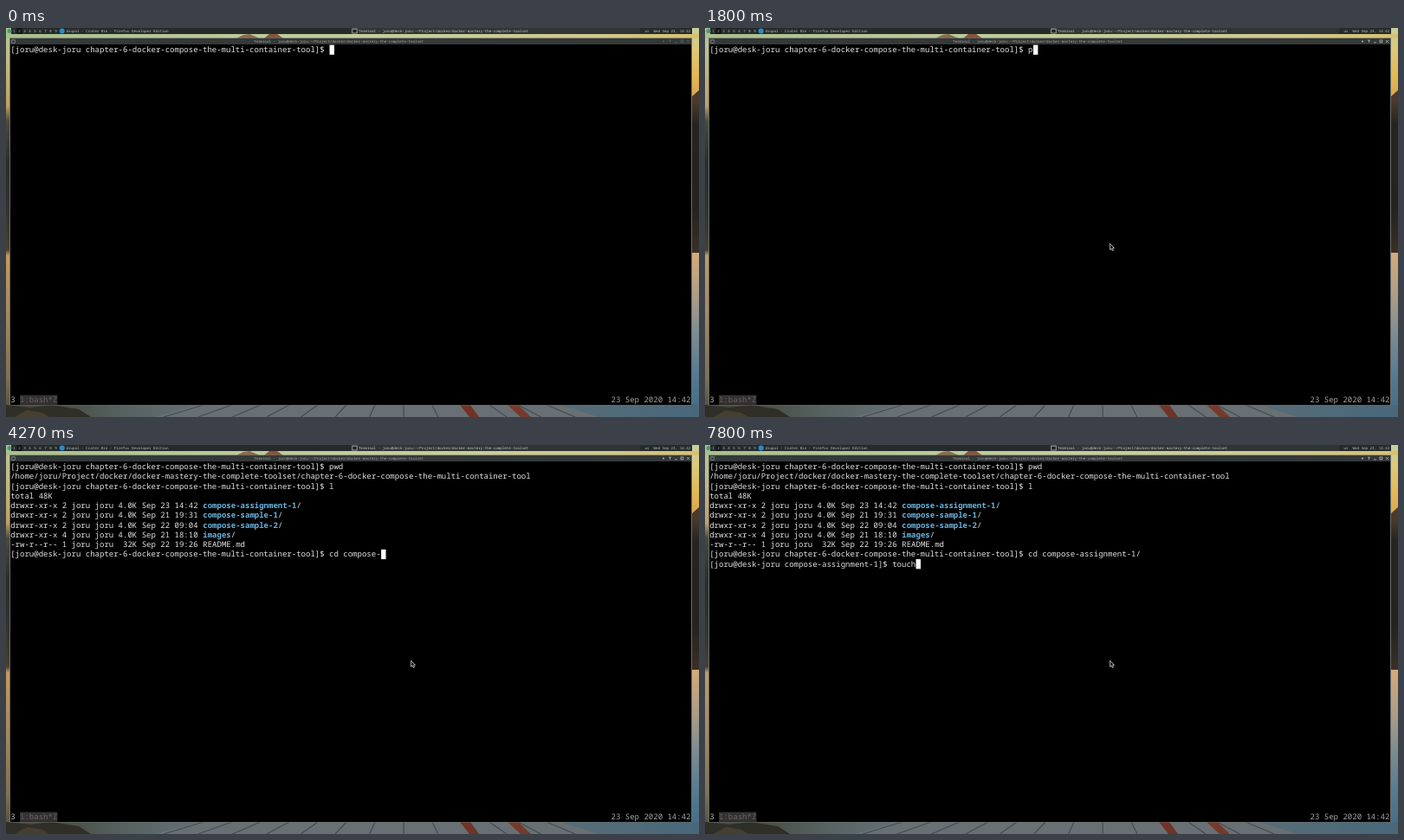
An HTML page with a canvas that plays this animation: 800x450 px, repeating every 8000 ms.

```html
<!DOCTYPE html>
<html lang="en">
<head>
<meta charset="utf-8">
<title>Terminal session</title>
<style>
html, body { margin: 0; width: 100%; height: 100%; overflow: hidden; background: #000; }
canvas { display: block; width: 800px; height: 450px; }
</style>
</head>
<body>
<canvas id="stage" width="800" height="450"></canvas>
<script>
const ctx = document.getElementById('stage').getContext('2d');
const LOOP = 8000;
const CELL_W = 65 / 12, CELL_H = 11.25, LEFT = 5.2, TOP = 19.6;
const MONO = '"Noto Sans Mono", "DejaVu Sans Mono", monospace';
const WHITE = '#e2e2e2', BLUE = '#68b4de';

const USER = 'joru', HOST = 'desk-joru';
const CHAPTER = 'chapter-6-docker-compose-the-multi-container-tool';
const COURSE = 'Project/docker/docker-mastery-the-complete-toolset';
const TITLE = `Terminal - ${USER}@${HOST}:~/${COURSE}`;
const prompt = dir => `[${USER}@${HOST} ${dir}]$ `;

// Each command: prompt folder, [time, typed text] pairs, time of Enter, output.
const entry = (mode, links, size, date, name, isDir) => ({
  text: `${mode} ${links} ${USER} ${USER} ${size} Sep ${date} `, name, isDir
});
const dir = (links, date, name) => entry('drwxr-xr-x', links, '4.0K', date, name, true);

const commands = [
  { dir: CHAPTER, keys: [[1800, 'p'], [1870, 'pw'], [2000, 'pwd']], enter: 2130,
    output: [{ text: `/home/${USER}/${COURSE}/${CHAPTER}` }] },
  { dir: CHAPTER, keys: [[2670, 'l']], enter: 3070,
    output: [
      { text: 'total 48K' },
      dir(2, '23 14:42', 'compose-assignment-1'),
      dir(2, '21 19:31', 'compose-sample-1'),
      dir(2, '22 09:04', 'compose-sample-2'),
      dir(4, '21 18:10', 'images'),
      entry('-rw-r--r--', 1, ' 32K', '22 19:26', 'README.md', false)
    ] },
  { dir: CHAPTER, keys: [
      [3670, 'c'], [3730, 'cd'], [3870, 'cd '], [3930, 'cd c'], [4070, 'cd co'],
      [4130, 'cd com'], [4270, 'cd compose-'], [5000, 'cd compose-a'],
      [5200, 'cd compose-assignment-1/']], enter: 5870, output: [] },
  { dir: 'compose-assignment-1', keys: [
      [6270, 't'], [6400, 'to'], [6530, 'toc'], [6600, 'tocu'], [6930, 'toc'],
      [7070, 'to'], [7600, 'tou'], [7670, 'touc'], [7800, 'touch']], enter: Infinity, output: [] }
];

function rect(x, y, w, h, fill) {
  ctx.fillStyle = fill;
  ctx.fillRect(x, y, w, h);
}

function poly(points, fill) {
  ctx.beginPath();
  points.forEach(([x, y]) => ctx.lineTo(x, y));
  ctx.closePath();
  ctx.fillStyle = fill;
  ctx.fill();
}

function dot(x, y, r, fill) {
  ctx.beginPath();
  ctx.arc(x, y, r, 0, Math.PI * 2);
  ctx.fillStyle = fill;
  ctx.fill();
}

function line(x1, y1, x2, y2, color, width = 1) {
  ctx.beginPath();
  ctx.moveTo(x1, y1);
  ctx.lineTo(x2, y2);
  ctx.strokeStyle = color;
  ctx.lineWidth = width;
  ctx.stroke();
}

function label(text, x, y, color, size = 4.2, weight = 400) {
  ctx.font = `${weight} ${size}px ${MONO}`;
  ctx.fillStyle = color;
  ctx.fillText(text, x, y);
}

function cells(text, col, row, color = WHITE, weight = 400) {
  label(text, LEFT + col * CELL_W, TOP + row * CELL_H + 8.5, color, CELL_W / 0.6, weight);
}

function gradient(x, y, w, h, stops, across = false) {
  const g = across ? ctx.createLinearGradient(x, 0, x + w, 0) : ctx.createLinearGradient(0, y, 0, y + h);
  stops.forEach(([at, color]) => g.addColorStop(at, color));
  rect(x, y, w, h, g);
}

function drawWallpaper() {
  // Left shore: hazy sky, dark trees, warm water.
  gradient(0, 0, 5, 450, [
    [0, '#b4c79a'], [0.08, '#c2bd86'], [0.2, '#c2a064'], [0.24, '#4a4a3c'],
    [0.35, '#2b2d28'], [0.48, '#35342e'], [0.57, '#4a4030'], [0.585, '#c39a62'],
    [0.75, '#a3875e'], [0.9, '#80704f'], [1, '#4a4838']
  ]);
  // Right shore: golden sky, dark hills, blue water.
  gradient(791, 0, 9, 450, [
    [0, '#c6cf9e'], [0.05, '#dcca7c'], [0.12, '#e3b956'], [0.18, '#d9a550']
  ]);
  gradient(791, 85, 9, 175, [[0, '#4b3a2b'], [0.15, '#25241f'], [0.7, '#24231f'], [1, '#3a2f26']]);
  poly([[791, 86], [791, 80], [800, 72], [800, 86]], '#4b3a2b');
  gradient(791, 260, 9, 190, [
    [0, '#d3ab7c'], [0.25, '#b09d86'], [0.5, '#7b8c92'], [0.75, '#557a90'], [1, '#426a80']
  ]);

  gradient(0, 7, 800, 5, [
    [0, '#a9c08d'], [0.35, '#bccb9a'], [0.6, '#c5ce9c'], [0.85, '#cfc98d'], [1, '#d9c070']
  ], true);
  poly([[266, 12], [274, 8], [281, 7], [293, 12]], '#8a6a4d');
  poly([[298, 12], [304, 7], [313, 7], [320, 12]], '#83553f');

  gradient(0, 436, 800, 14, [
    [0, '#45463a'], [0.1, '#4c5149'], [0.17, '#566260'], [0.25, '#5f6d70'],
    [0.82, '#566c77'], [1, '#48687a']
  ], true);
  poly([[0, 436], [28, 439], [52, 436], [84, 441], [98, 450], [0, 450]], '#2f2f27');
  poly([[10, 450], [24, 442], [42, 445], [50, 450]], '#463f30');
  poly([[222, 436], [640, 436], [684, 450], [172, 450]], '#687074');
  for (let i = 0; i < 13; i++) {
    const x = 228 + i * 33;
    line(x, 436, x - 46 + i * 6.6, 450, '#454b4f', 1.2);
  }
  poly([[524, 436], [536, 436], [546, 450], [535, 450]], '#6f3426');
  poly([[579, 436], [591, 436], [606, 450], [594, 450]], '#763a2a');
}

function drawPanel() {
  rect(0, 0, 6, 7, '#a9c08d');
  rect(6, 0, 786, 7, '#262b2a');
  rect(398, 0, 334, 7, '#303534');
  dot(4, 3.5, 2.5, '#4b9a76');
  rect(12.5, 0, 6, 7, '#111413');
  for (let n = 1; n <= 9; n++) label(n, 8.3 + (n - 1) * 6, 5, '#b4b8b5');
  dot(64.7, 3.5, 3, '#258dd0');
  label('drupal - Crater Bin - Firefox Developer Edition', 69.5, 5, '#b8bcba');
  rect(399.5, 0.7, 6, 5.6, '#c5c9c8');
  rect(400.2, 1.5, 4.6, 4.1, '#202322');
  label(TITLE, 407, 5, '#c6c9c8');
  label('us', 737.5, 5, '#b8bcba');
  label('Wed Sep 23, 14:42', 747.5, 5, '#b8bcba');
}

function drawWindow(lit) {
  rect(4, 11.5, 788, 425, '#666c6c');
  rect(5, 12, 786, 424, '#000');
  rect(5, 12, 786, 7, '#343838');
  rect(6.5, 13.5, 4, 4, '#a5a9a8');
  rect(7.2, 14.3, 2.6, 2.5, '#202322');
  label(TITLE, 286, 17, '#a5aaa8');
  const color = lit ? '#b0b4b2' : '#5a5f5d';
  dot(759, 15.5, 1, color);
  line(765, 14.2, 768, 14.2, color, 0.8);
  line(766.5, 14.2, 766.5, 17, color, 0.8);
  line(772, 16.8, 775, 16.8, color, 0.8);
  ctx.lineWidth = 0.8;
  ctx.strokeRect(779, 14, 2.8, 2.8);
  line(786, 14, 789, 17, color, 0.8);
  line(789, 14, 786, 17, color, 0.8);
}

function drawStatus() {
  const row = 36;
  cells('3', 0, row, '#b4b4b4');
  rect(LEFT + 2 * CELL_W, TOP + row * CELL_H, 8 * CELL_W, CELL_H, '#343131');
  cells('1:bash*Z', 2, row, '#696464');
  cells('23 Sep 2020 14:42', 128, row, '#a4a4a4');
}

function drawCursor(col, row, hollow) {
  const x = LEFT + col * CELL_W, y = TOP + row * CELL_H;
  if (!hollow) return rect(x, y, CELL_W, CELL_H, '#fff');
  ctx.strokeStyle = '#d0d0d0';
  ctx.lineWidth = 0.8;
  ctx.strokeRect(x + 0.4, y + 0.4, CELL_W - 0.6, CELL_H - 0.6);
}

function drawSession(t, hollow) {
  let row = 0;
  for (const cmd of commands) {
    const key = cmd.keys.filter(([at]) => t >= at).pop();
    const text = prompt(cmd.dir) + (key ? key[1] : '');
    cells(text, 0, row);
    if (t < cmd.enter) return drawCursor(text.length, row, hollow);
    row++;
    for (const out of cmd.output) {
      cells(out.text, 0, row);
      if (out.name) {
        const col = out.text.length;
        cells(out.name, col, row, out.isDir ? BLUE : WHITE, out.isDir ? 700 : 400);
        if (out.isDir) cells('/', col + out.name.length, row);
      }
      row++;
    }
  }
}

function drawPointer(x, y) {
  const shape = [[0, 0], [0, 7.2], [1.6, 5.8], [2.7, 8.2], [3.9, 7.6], [2.9, 5.3], [4.8, 5.1]];
  poly(shape.map(([dx, dy]) => [x + dx, y + dy]), '#111');
  ctx.strokeStyle = '#d5d5d5';
  ctx.lineWidth = 0.8;
  ctx.stroke();
}

function draw(t) {
  const awake = t >= 70;
  drawWallpaper();
  drawPanel();
  drawWindow(awake);
  drawStatus();
  drawSession(t, awake && t < 730);
  if (awake) drawPointer(467.6, 249.4);
}

ctx.textRendering = 'geometricPrecision';
const start = performance.now();
function tick() {
  draw((performance.now() - start) % LOOP);
  requestAnimationFrame(tick);
}
tick();
</script>
</body>
</html>
```
